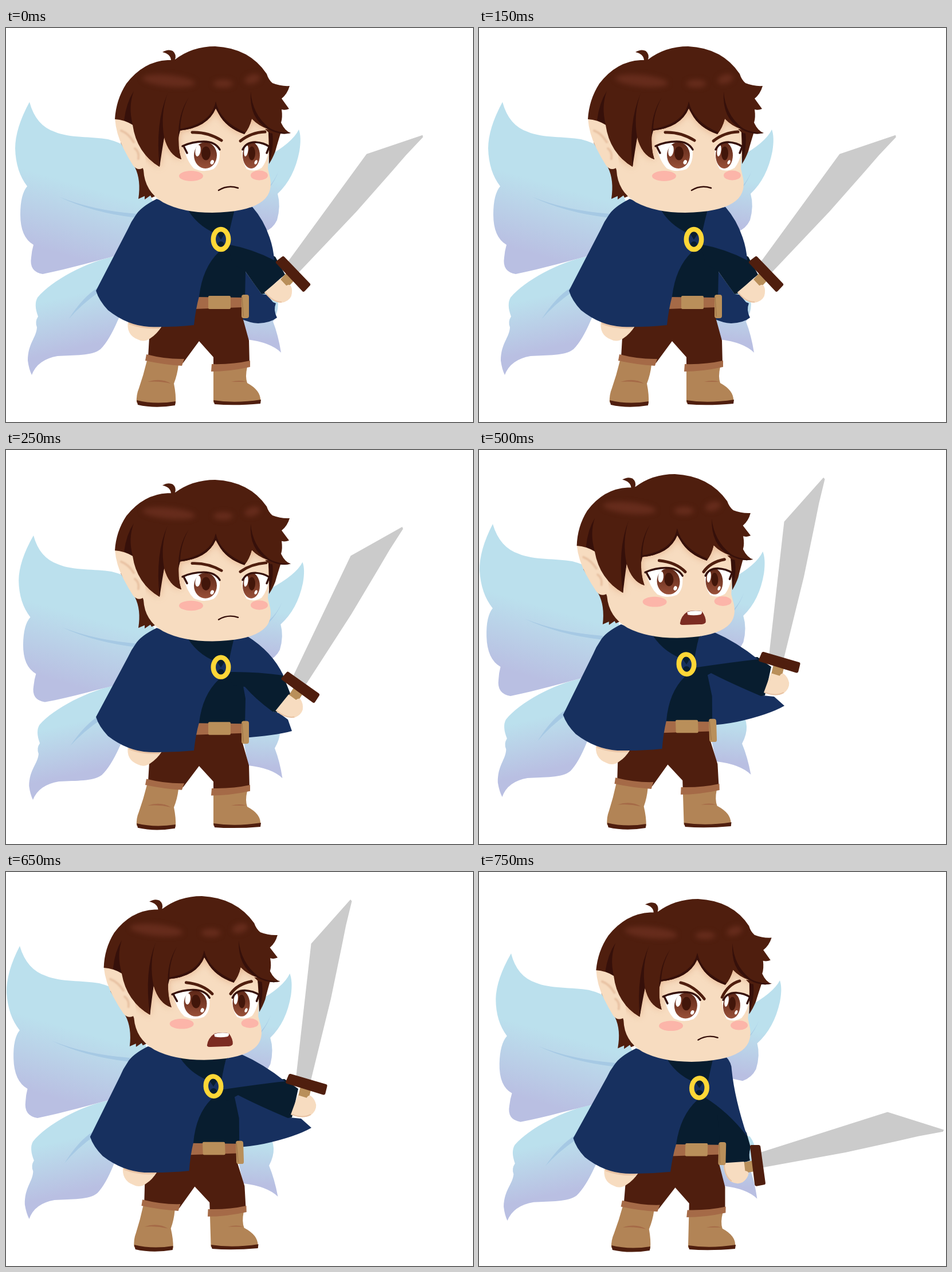
Recreate the animation shown at these times as an HTML page with a canvas. Size 815 px wide and 687 px high, loop 1 s.

```html
<!DOCTYPE html>
<html lang="en">
<head>
<meta charset="utf-8">
<title>Fairy swordsman</title>
<style>
html, body { margin: 0; width: 100%; height: 100%; overflow: hidden; background: #fff; }
canvas { display: block; }
</style>
</head>
<body>
<canvas id="stage" width="815" height="687"></canvas>
<script>
const ctx = document.getElementById('stage').getContext('2d');

const C = {
  cape: '#17305f', cloth: '#081d2f', hair: '#4f1e0e', dark: '#36100a', shine: '#662c1c',
  skin: '#f7dcc0', shade: '#e8c2a3', blush: '#fcb5a9', gold: '#ffd737', boot: '#b28456',
  cuff: '#a56a47', tan: '#b98f5a', steel: '#cbcbcb', vein: '#a6c9e4', sky: '#bbe0ed', lilac: '#b9bfe2'
};

// body and wings: [shear x, scale y, shift x, shift y]; sword: [x, y, degrees]
const POSES = [
  {
    body: [0, 1, 0, 0], wings: [0, 1, 0, 0], sword: [500, 429, -46.7],
    back: 'M410,420L418,425L446,464L455,465L466,478L471,480Q466,492 473,505Q462,514 440,515Q425,514 410,507Z',
    arm: 'M385,370Q440,382 470,399L487,430Q470,443 453,463L446,464Q432,445 418,425L395,410Z',
    flap: 'M399,317L430,312Q450,335 460,365Q467,385 468,405Q430,385 386,377Q390,350 399,317Z',
    brows: 'M325,182Q352,181 376,196M452,181Q428,182 409,197'
  },
  {
    body: [0, .971, 0, 20.9], wings: [-.0105, .9685, 8.35, 24.1], sword: [513, 414, -57.3],
    back: 'M410,405L420,410L466,456L477,459L492,470L499,490Q470,498 412,502Z',
    arm: 'M385,380Q440,378 482,389L497,427Q482,440 473,458L465,456Q435,434 417,413L395,410Z',
    flap: 'M398,328L420,324Q465,352 484,393Q435,386 386,387Q390,360 398,328Z',
    brows: 'M325,182Q352,181 376,195M454,181Q428,183 409,197'
  },
  {
    body: [.0304, .9856, -24.2, 10.4], wings: [.0263, 1, -20.4, 0], sword: [524, 371, -76.4],
    back: 'M396,382L408,388L495,428L515,430L533,446Q505,462 450,474Q425,479 402,480Z',
    arm: 'M372,372Q440,364 486,361L510,378L499,428L492,429Q440,407 405,389L385,400Z',
    flap: 'M384,326L409,317Q450,335 487,365Q440,370 374,380Q377,352 384,326Z',
    brows: 'M333,185Q362,188 378,205M447,183Q422,188 410,205', open: true
  },
  {
    body: [-.023, .979, 18, 15.7], wings: [-.0221, .979, 17.9, 15.7], sword: [485, 511, -10.5],
    back: '',
    arm: 'M394,385Q442,412 467,455L474,480Q470,494 473,503Q455,510 428,507L420,470L415,410Z',
    flap: 'M408,327L430,321Q441,332 441,345Q446,395 468,461Q435,418 394,393Q400,362 408,327Z',
    brows: 'M338,181Q362,187 380,210M441,178Q421,184 411,207'
  }
];

const FACE = 'M215,170L240,248Q242,285 274,304Q308,322 360,322Q418,321 443,305Q466,291 461,262L457,245L462,170L380,130Z';
const HAIR = 'M190,159Q192,125 210,97Q240,58 282,56L288,56Q287,45 273,42Q283,36 291,40Q298,46 295,55' +
  'Q325,32 365,32Q425,35 455,80Q458,90 465,96Q480,102 495,101Q491,115 481,123L494,141Q487,144 481,142' +
  'Q483,156 480,165Q487,180 497,183Q478,188 457,176Q440,170 429,158Q425,174 416,185Q384,174 371,149L366,140' +
  'Q352,174 302,179Q299,208 306,229Q284,222 276,190Q270,215 268,242Q228,218 221,169Q207,160 190,159Z';

function fill(d, color) {
  ctx.fillStyle = color;
  ctx.fill(new Path2D(d));
}

function line(d, color, width) {
  ctx.strokeStyle = color;
  ctx.lineWidth = width;
  ctx.lineCap = ctx.lineJoin = 'round';
  ctx.stroke(new Path2D(d));
}

function oval(x, y, rx, ry, color, turn = 0) {
  ctx.fillStyle = color;
  ctx.beginPath();
  ctx.ellipse(x, y, rx, ry, turn, 0, Math.PI * 2);
  ctx.fill();
}

function fade(x0, y0, x1, y1, from, to) {
  const g = ctx.createLinearGradient(x0, y0, x1, y1);
  g.addColorStop(0, from);
  g.addColorStop(1, to);
  return g;
}

function place([shear, scale, x, y]) {
  ctx.setTransform(1, 0, shear, scale, x, y);
}

function unplace() {
  ctx.setTransform(1, 0, 0, 1, 0, 0);
}

function drawWings() {
  fill('M511,177Q516,190 512,215Q503,262 474,289Q480,310 473,335Q466,350 450,356L400,345L400,300L455,225Q500,200 511,177Z',
    fade(490, 270, 478, 350, C.sky, C.lilac));
  fill('M476,249Q465,275 448,286L434,302Q464,282 476,249Z', C.vein);
  fill('M400,440L465,455Q484,480 466,512Q475,535 480,566Q462,548 420,543Z',
    fade(450, 475, 445, 545, C.sky, C.lilac));
  fill('M190,398C140,408 80,440 55,470Q48,482 56,503Q50,512 54,522C53,540 38,550 38,580Q40,595 45,605' +
    'Q55,578 90,572C120,570 150,572 165,560Q180,545 195,510L240,420Z',
    fade(120, 465, 140, 555, C.sky, C.lilac));
  fill('M109,508Q135,468 160,453L164,459Q130,483 109,508Z', C.vein);
  fill('M41,129Q52,170 85,181C110,192 150,189 178,194Q198,199 213,209L260,310L205,394C160,405 110,420 64,429' +
    'Q40,425 44,400Q45,388 48,378Q25,365 25,325Q25,290 37,276Q17,250 16,210Q16,175 41,129Z',
    fade(150, 280, 115, 400, C.sky, C.lilac));
  fill('M92,294Q150,318 228,324L228,331Q150,322 92,294Z', C.vein);
}

function drawLegs() {
  fill('M262,505L250,540L248,574L309,584L337,546L362,574L362,590L425,586L424,545L413,505L420,480L320,480Z', C.hair);
  fill('M213,510Q209,535 230,543Q241,549 252,541Q264,533 272,520Z', C.skin);
  line('M216,515Q240,524 267,522', C.shade, 4);

  fill('M246,580L301,587Q299,605 293,620Q297,640 296,655L262,658L228,653Q227,640 232,628Q240,605 246,580Z', C.boot);
  fill('M228,649Q260,657 296,651L295,658Q260,664 230,657Z', C.hair);
  fill('M247,617Q270,609 288,620Q268,615 247,617Z', C.cuff);
  fill('M245,569Q280,578 311,577L307,589Q275,587 243,580Z', C.cuff);

  fill('M362,597L421,591Q417,608 421,619Q445,632 444,650L405,655L362,653Z', C.boot);
  fill('M362,649Q400,655 445,648L444,655Q400,659 364,656Z', C.hair);
  fill('M393,617Q408,613 419,617Q408,617 393,617Z', C.cuff);
  fill('M359,586Q395,587 426,580L426,591Q390,599 358,599Z', C.cuff);
}

function drawTorso() {
  fill('M316,316L402,314L410,380L418,425L417,472L332,472L350,390Z', C.cloth);
  fill('M330,469L413,470L413,487L328,490Z', C.cuff);
  ctx.fillStyle = C.tan;
  ctx.beginPath();
  ctx.roundRect(353, 467, 39, 23, 2);
  ctx.fill();
}

function drawSword([x, y, deg]) {
  ctx.save();
  ctx.translate(x, y);
  ctx.rotate(deg * Math.PI / 180);
  fill('M5,-20L241,-49.5L332,-1L330,2L286,2L248,3.5L156,6.5L5,6Z', C.steel);
  fill('M-25,-9L0,-9L0,10L-25,10Z', C.tan);
  const guard = 'M-3,-33L9,-31L6,33L-7,33Z';
  fill(guard, C.hair);
  line(guard, C.hair, 6);
  fill('M-57,-14L-21,-10L-22,6Q-16,8 -17,12Q-20,20 -30,25Q-40,28 -50,20Q-60,8 -57,-14Z', C.skin);
  line('M-56,-12Q-59,8 -49,19', C.shade, 2);
  ctx.restore();
}

function drawCape() {
  ctx.fillStyle = C.tan;
  ctx.beginPath();
  ctx.roundRect(411, 465, 13, 41, 4);
  ctx.fill();
  line('M412,469L414,502', '#a0764a', 1.5);

  fill('M263,298Q235,312 226,327Q218,338 213,350L157,458Q162,475 178,492Q212,519 250,521Q290,522 328,518' +
    'Q331,490 337,468Q343,418 371,391L376,362Q338,350 318,318Z', C.cape);

  oval(375, 368.5, 14, 18, C.cape);
  fill('M364,352L386,352L375,369Z', C.cloth);
  oval(375, 378, 6, 6, C.cloth);
  ctx.strokeStyle = C.gold;
  ctx.lineWidth = 8.5;
  ctx.beginPath();
  ctx.ellipse(375, 368.5, 13.2, 17.5, 0, 0, Math.PI * 2);
  ctx.stroke();
}

function drawEye(white, lash, x, rx, hx) {
  fill(white, '#fff');
  oval(x, 222, rx, 23, fade(0, 200, 0, 245, '#5f2818', '#985039'));
  oval(x + 1, 218.5, rx * .4, 12, '#42160a');
  oval(x - hx, 214, rx * .23, 10, '#fff', .15);
  oval(x + hx * .9, 234, rx * .15, 4, '#fff', .4);
  line(lash, C.dark, 3.5);
}

function drawFace(pose) {
  fill('M200,200L225,243Q236,265 231,298L242,293L242,299L252,292L254,296L272,288L262,200Z', C.hair);
  fill(FACE, C.skin);

  // soft shade cast by the fringe
  ctx.save();
  ctx.clip(new Path2D(FACE));
  ctx.shadowColor = 'rgba(214,150,108,.65)';
  ctx.shadowBlur = 14;
  fill(HAIR, C.hair);
  ctx.restore();

  fill('M452,176L481,178Q474,200 470,215Q465,228 459,237Q459,210 458,182Z', C.hair);
  fill('M458,182L465,184Q468,205 459,237Q461,205 458,182Z', C.dark);

  fill('M190,157Q214,162 224,170L242,205L244,240Q232,252 222,240Q213,226 205,210Q192,185 190,157Z', C.skin);
  ctx.save();
  ctx.filter = 'blur(1px)';
  line('M201,179Q214,184 223,199M225,210Q233,216 231,228', C.shade, 4);
  ctx.restore();

  oval(323, 258, 21, 9, C.blush);
  oval(442, 257, 15, 8.5, C.blush);
  drawEye('M310,207Q325,197 345,197L372,207Q376,235 362,246Q345,253 328,245Q315,232 310,207Z',
    'M308,206Q325,198 345,198Q365,198 373,212M311,208L316,218', 348, 20, 13);
  drawEye('M412,208Q422,198 436,198L460,207Q456,232 446,244Q432,252 420,246Q410,230 412,208Z',
    'M413,212Q419,199 435,199Q450,200 460,207M459,208L455,218', 428, 15, 9);

  if (pose.open) {
    fill('M366,296Q368,283 380,275Q395,272 405,275Q412,285 411,294Q409,298 400,298L372,299Q366,299 366,296Z', '#7c2c22');
    fill('M379,276Q392,272 405,275Q405,280 401,281Q390,283 380,281Z', '#fff');
  } else {
    line('M371,283Q387,273 405,279', C.dark, 2.5);
  }
}

function drawHair(pose) {
  fill(HAIR, C.hair);
  fill('M223,110Q210,130 206,161L221,168Q213,137 223,110Z', C.dark);
  fill('M282,114Q260,165 268,242Q272,215 276,191Q269,150 282,114Z', C.dark);
  fill('M319,121Q300,150 301,190L304,179Q304,148 319,121Z', C.dark);
  fill('M366,128Q358,168 302,176L302,179Q352,174 366,140L371,149Q384,174 416,185L418,182Q374,164 366,128Z', C.dark);
  fill('M427,111Q430,150 458,173Q470,182 497,183Q478,188 457,176Q424,158 427,111Z', C.dark);
  ctx.save();
  ctx.filter = 'blur(4px)';
  oval(284, 92, 46, 10, C.shine, .1);
  oval(379, 97, 17, 7, C.shine);
  oval(430, 89, 14, 8, C.shine, -.3);
  ctx.restore();
  line(pose.brows, C.hair, 5);
}

function draw(pose) {
  unplace();
  ctx.fillStyle = '#fff';
  ctx.fillRect(0, 0, 815, 687);
  place(pose.wings);
  drawWings();
  unplace();
  fill(pose.back, C.cape);
  place(pose.body);
  drawLegs();
  drawTorso();
  unplace();
  fill(pose.arm, C.cloth);
  fill(pose.flap, C.cape);
  drawSword(pose.sword);
  place(pose.body);
  drawCape();
  drawFace(pose);
  drawHair(pose);
}

const HOLD = 250;
let shown = -1;

function tick() {
  const i = Math.floor(performance.now() / HOLD) % POSES.length;
  if (i !== shown) draw(POSES[shown = i]);
  requestAnimationFrame(tick);
}
tick();
</script>
</body>
</html>
```
